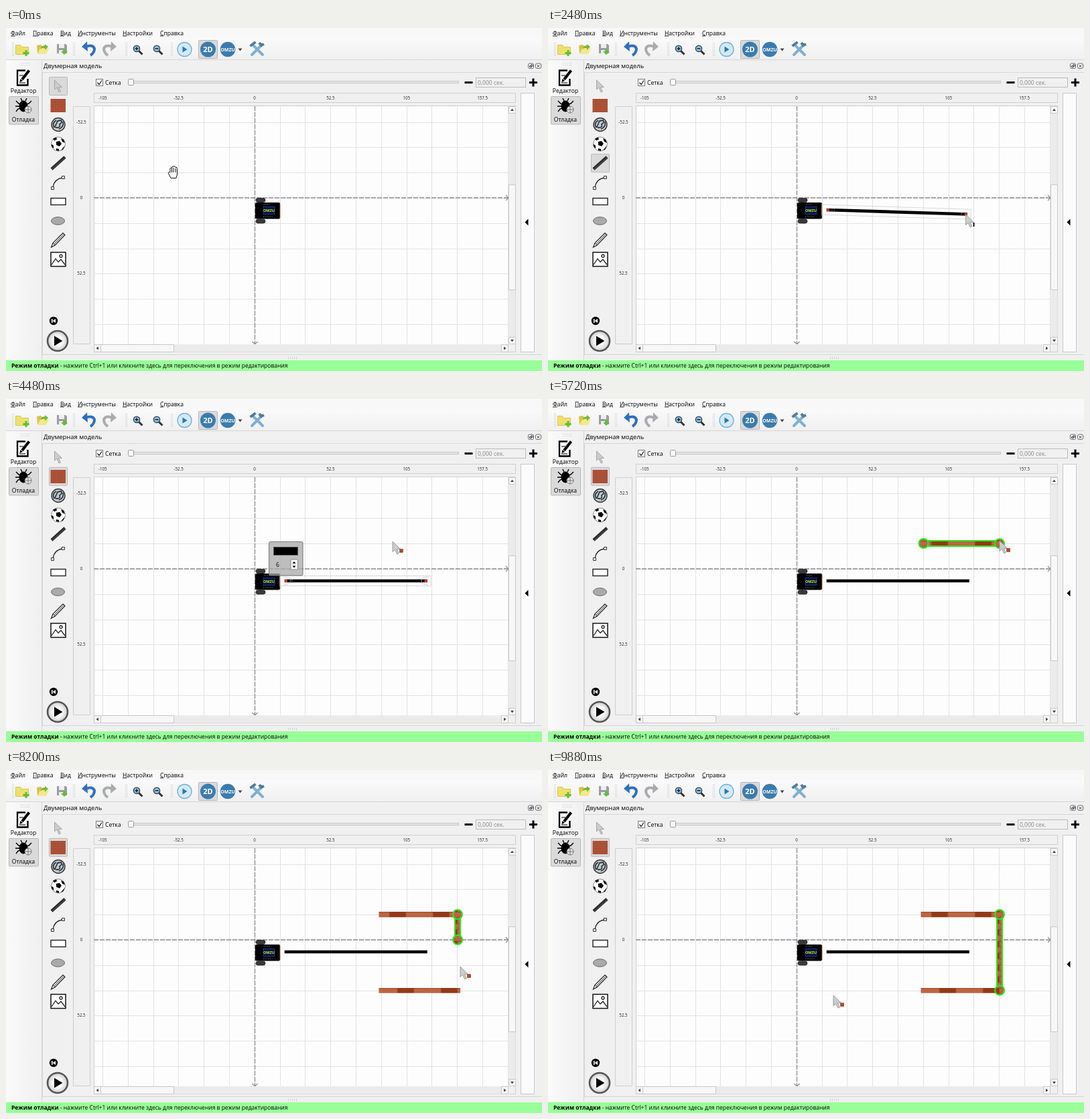
Write an HTML page that moves like this. It is 800 px wide and 513 px high and loops after 9920 ms.

```html
<!DOCTYPE html>
<html lang="ru">
<head>
<meta charset="utf-8">
<style>
  html, body { margin: 0; width: 100%; height: 100%; overflow: hidden; background: #f0f0f0; }
  svg { display: block; width: 800px; height: 513px; font: 8.6px "Open Sans", "Noto Sans", sans-serif; }
  .mid { text-anchor: middle; }
  .ruler { font-size: 6.2px; text-anchor: middle; fill: #222; }
  .ink { fill: none; stroke: #222; stroke-width: 1.3; }
  .panel { fill: #f0f0f0; stroke: #cfcfcf; }
  .pressed { fill: #dadada; stroke: #b8b8b8; }
</style>
</head>
<body>
<svg viewBox="0 0 800 513">
  <defs>
    <pattern id="brick" x="556.5" y="212" width="65" height="17.54" patternUnits="userSpaceOnUse">
      <path fill="#b9633f" d="M0 0h65v18H0z"/>
      <path fill="#953817" d="M16 0h24v8.77H16zM28 8.77h24v8.77H28z"/>
      <path fill="none" stroke="#84412a" stroke-width=".7" d="M0 .3h65M0 9h65M16 0v8.8M40 0v8.8M28 8.8v8.8M52 8.8v8.8"/>
      <path fill="none" stroke="#cc8060" stroke-width=".6" opacity=".6" d="M0 4.5h16M41 3.5h24M0 13.5h28M53 12.5h12"/>
    </pattern>
    <pattern id="wall" x="66" y="105" width="12" height="7" patternUnits="userSpaceOnUse">
      <path fill="#b5492b" d="M0 0h12v7H0z"/>
      <path fill="none" stroke="#93614f" stroke-width=".9" d="M0 .5h12M0 4h12M3.500 0v4M9.500 4v3"/>
    </pattern>
    <radialGradient id="shine"><stop offset=".4" stop-color="#fff"/><stop offset="1" stop-color="#ccc"/></radialGradient>
    <linearGradient id="barShade" x2="0" y2="1"><stop stop-color="#fafafa"/><stop offset="1" stop-color="#f0f0f0"/></linearGradient>
    <linearGradient id="sideShade"><stop stop-color="#fafafa"/><stop offset="1" stop-color="#f0f0f0"/></linearGradient>
    <clipPath id="view"><path d="M131 117h619v356H131z"/></clipPath>
  </defs>

  <path fill="#f0f0f0" d="M0 0h800v513H0z"/>
  <path fill="#f8f8f8" d="M0 0h800v15H0z"/>
  <path fill="url(#barShade)" d="M0 15h800v32H0z"/>
  <path fill="url(#sideShade)" d="M0 48h53v448H0z"/>
  <path stroke="#d6d6d6" d="M0 47.5h800M53.5 48v448"/>
  <g id="menu"></g>

  <!-- toolbar -->
  <path stroke="#bbb" stroke-dasharray="1 2" d="M9.5 22v21M11.5 22v21M100.5 22v21M102.5 22v21M178.5 22v21M180.5 22v21M246.5 22v21M248.5 22v21"/>
  <path fill="#efe06e" stroke="#d8c650" d="M14.500 25.500h7l2 3h10v11h-19z"/>
  <path stroke="#62c02f" stroke-width="3" d="M30 33v9M25.500 37.500h9"/>
  <path fill="#d9c04a" d="M46 26l6-1 2 2h7l-2 11H47z"/>
  <path fill="#f3e88a" d="M47 39l4-9h13l-4 9z"/>
  <path fill="#74b83d" d="M51 32q2-6 7-6v-2l5 4-5 5v-3q-4-1-7 2z"/>
  <path fill="#9a9da0" d="M76 24h13l2 2v12H76z"/>
  <path fill="#eee" d="M79 24h8v6h-8zM79 33h9v5h-9z"/>
  <path fill="#62bd38" d="M85 32h4v3h3l-5 5-5-5h3z"/>
  <g id="undo">
    <path fill="none" stroke="currentColor" stroke-width="4" d="M119 28q11-4 13 3 0 6-6 10"/>
    <path fill="currentColor" d="M113 28l8-8 1 15z"/>
  </g>
  <g id="zoom">
    <path stroke="#333" stroke-width="3" d="M198 34l5.500 5.500"/>
    <circle cx="195" cy="30.800" r="4.600" fill="#8fc4e6" stroke="#384b57" stroke-width="1.500"/>
    <path stroke="#123" stroke-width="1.500" d="M192.500 30.800h5"/>
  </g>
  <use href="#zoom" x="30"/>
  <path stroke="#123" stroke-width="1.500" d="M195 28.300v5"/>
  <circle cx="266.500" cy="32" r="10.500" fill="#d3eaf7" stroke="#6fb2d9" stroke-width="1.300"/>
  <path fill="#2a78ad" d="M263.500 27.500l7 4.500-7 4.500z"/>
  <rect class="pressed" x="287.500" y="18.500" width="28" height="27" rx="1"/>
  <g fill="#3b7cae"><circle cx="301.500" cy="32" r="11.500"/><circle cx="331" cy="32" r="11.300"/></g>
  <g class="mid" fill="#fff" font-weight="bold">
    <text x="301.500" y="36" font-size="11">2D</text><text x="331" y="34.700" font-size="7">OMZU</text>
  </g>
  <path fill="#444" d="M346.500 30.500h6l-3 4z"/>
  <path stroke="#7fb0d2" stroke-width="4" stroke-linecap="round" d="M369 26l14 14M381 26l-14 14"/>
  <path stroke="#517d9c" stroke-width="4" d="M364.500 27l8-6M378 22l3 4 4-2"/>

  <!-- mode buttons -->
  <path stroke="#bbb" stroke-dasharray="1 2" d="M22 52.500h14M22 55.500h14"/>
  <path fill="none" stroke="#000" stroke-width="2.300" d="M29 63.500H17v22h15.500V76"/>
  <path stroke="#000" stroke-width="4" d="M24 77L34.500 63.500"/>
  <path fill="#000" d="M20.500 81l1-5 3.500 3z"/>
  <path stroke="#000" d="M20 71h6M20 82h9"/>
  <rect class="pressed" x="4.500" y="102.500" width="44" height="41.500" rx="1"/>
  <path fill="none" stroke="#000" stroke-width="1.400" d="M22 105l2 4M31 105l-2 4M15 109l4 4 4 1M38 109l-4 4-4 1M14 117h8M15 125l3-4 4-1"/>
  <ellipse cx="26" cy="117" rx="6.500" ry="8.500"/>
  <circle cx="33" cy="122" r="5" fill="#e2e2e2" stroke="#777"/>
  <path stroke="#777" d="M28 122h10M33 117v10"/>
  <text class="mid" x="26" y="97">Редактор</text>
  <text class="mid" x="26" y="140">Отладка</text>

  <!-- dock -->
  <text x="56" y="60" font-size="9.400">Двумерная модель</text>
  <g fill="#fff" stroke="#666"><rect x="779.500" y="53" width="8" height="7.500" rx="2"/><rect x="790.500" y="53" width="8" height="7.500" rx="2"/></g>
  <path fill="none" stroke="#333" d="M781.500 58.500v-2h3v2zM783 55h3v3M792.500 55l4 4M796.500 55l-4 4"/>
  <path fill="none" stroke="#d6d6d6" d="M54.500 488V66.500H800M54 488.500h746"/>

  <rect x="134.500" y="76.500" width="10" height="10" fill="#fff" stroke="#777"/>
  <path class="ink" d="M136.500 81.500l2.500 3 4-6"/>
  <text x="148" y="84.500">Сетка</text>
  <rect x="182.500" y="79.500" width="493" height="3" fill="#e6e6e6" stroke="#c4c4c4"/>
  <rect x="182.500" y="76.500" width="8" height="9" rx="1" fill="#fafafa" stroke="#999"/>
  <path stroke="#000" stroke-width="3" d="M684.500 81.500h12M781 81.500h12M787 75.500v12"/>
  <rect class="panel" x="701.500" y="74.500" width="74" height="14" style="stroke:#bbb"/>
  <text x="704" y="84.500" fill="#888">0,000 сек.</text>

  <path class="panel" d="M131.500 97.500h629v14h-629zM100.500 117.500h25v355h-25z"/>
  <path fill="#fdfdfd" d="M131 117h619v356H131z"/>
  <path class="panel" d="M131.500 116.500h629v368h-629z" style="fill:none"/>
  <path fill="#ebebeb" d="M750.500 117h10v356h-10zM132 473.500h618v11H132z"/>
  <path fill="#f7f7f7" stroke="#c8c8c8" d="M750.500 234.500h10v157h-10zM141.500 473.500h109v11h-109zM750.500 117.500h10v10h-10zM750.500 462.500h10v10h-10zM131.500 473.500h10v11h-10zM739.500 473.500h10v11h-10z"/>
  <path fill="#444" d="M753 124h5l-2.500-3.500zM753 466h5l-2.500 3.500zM138 476.500v5l-3.500-2.500zM743 476.500v5l3.500-2.500z"/>
  <rect x="768.500" y="97.500" width="20" height="387" fill="#fbfbfb" stroke="#c8c8c8"/>
  <path d="M779.500 285.500v10l-5-5z"/>
  <path stroke="#bbb" stroke-dasharray="1 2" d="M421 492.500h14M421 494.500h14"/>
  <path fill="#99ff99" d="M0 497h800v16H0z"/>
  <text x="8" y="508.300" font-size="8.500"><tspan font-weight="bold">Режим отладки</tspan> - нажмите Ctrl+1 или кликните здесь для переключения в режим редактирования</text>

  <!-- drawing tools -->
  <rect id="picked" class="pressed" x="64.500" width="27" height="27" rx="1"/>
  <path fill="#ccc" stroke="#a5a5a5" d="M72.500 78v14l3.500-3 3 7 2.500-1-3-6.500h5z"/>
  <path fill="url(#wall)" d="M66.500 106h22.500v20H66.500z"/>
  <circle cx="78" cy="144.500" r="10" fill="#c3cace" stroke="#333" stroke-width="1.400"/>
  <path fill="none" stroke="#2e3a40" stroke-width="1.800" d="M77 139l5-1q3 3-2 6 2 5-4 5l-3-1zM72 149q-4-7 3-11M79 151q8-3 6-11"/>
  <circle cx="78" cy="173.500" r="10.500" fill="#fff" stroke="#888"/>
  <path d="M75 170l5-1 3 4-3 4-5-2zM70 165.500l5-2 1 3-4 2zM82 165l4 2 2 5-4-2zM67.500 174l3 1 1 5-3-2zM86 178l2-2-3 6-3 1zM75 180l4 1v3l-4-1z"/>
  <path stroke="#2b2b2b" stroke-width="4.500" d="M68 211l20-18"/>
  <path stroke="#666" stroke-width=".8" d="M69 211l19-17"/>
  <path class="ink" d="M70 238q2-12 14-14"/>
  <path fill="#fff" stroke="#333" d="M67.500 237.500h4v4h-4zM83.500 221.500h4v4h-4z"/>
  <rect x="67" y="254.500" width="22" height="10" fill="#fff" stroke="#222" stroke-width="1.400"/>
  <ellipse cx="77.500" cy="288.500" rx="10" ry="5.800" fill="#aaa" stroke="#666"/>
  <path fill="#fff" stroke="#222" stroke-width="1.200" d="M67.500 328l2.500-6.500 15-15 3 3-15 15.500z"/>
  <path stroke="#222" d="M70 321.500l3 3.500M72 323l14-14.500"/>
  <rect x="67" y="335.500" width="22" height="21" fill="#fff" stroke="#111" stroke-width="1.500"/>
  <path class="ink" d="M68 354l6-9 4 5 4-4 6 8"/><circle cx="82" cy="341" r="2" class="ink"/>
  <circle cx="71" cy="438" r="6.200"/>
  <path fill="#fff" d="M68 435h1.500v6H68zM74 435v6l-4.500-3z"/>
  <circle cx="77" cy="468" r="15" fill="url(#shine)" stroke="#555" stroke-width="2.600"/>
  <path d="M72 460.500l12.500 7.500-12.500 7.500z"/>

  <!-- scene -->
  <g clip-path="url(#view)">
    <path id="grid" fill="none" stroke="#e2e2e6"/>
    <path fill="none" stroke="#8c8c92" stroke-width="1.300" stroke-dasharray="7 2" d="M131 254H750M371.500 117V473"/>
    <path fill="none" stroke="#8c8c92" stroke-width="1.200" d="M746 250l4 4-4 4M367.500 469l4 4 4-4"/>
    <path stroke="#555" d="M379.500 256v34"/>
    <rect x="372" y="261" width="37" height="24.500" rx="2"/>
    <path stroke="#bd7440" stroke-width=".8" d="M409 263v21"/>
    <rect x="384" y="267.500" width="17" height="11" fill="#07143a" stroke="#1d3496"/>
    <path stroke="#888" stroke-dasharray="1 1.500" d="M385 264h9M384 282.500h14"/>
    <text class="mid" x="392.500" y="275.300" font-size="5.600" font-weight="bold" fill="#c4f02c">OMZU</text>
    <g fill="#3a3a3d" stroke="#222" stroke-width=".8"><rect x="373" y="254.500" width="14" height="6" rx="3"/><rect x="373" y="286" width="14" height="6" rx="3"/></g>

    <g id="stroke">
      <path id="bar" stroke="#000" stroke-width="4.600" stroke-linecap="square"/>
      <g id="handles">
        <rect id="frame" x="-9.500" y="-7.500" height="15" fill="none" stroke="#c6c6c6" stroke-dasharray="2 1"/>
        <path stroke="#d2331c" stroke-width="4" d="M-2 0h4"/>
        <path id="endHandle" stroke="#d2331c" stroke-width="4" d="M-2 0h4"/>
        <path id="marks" fill="none" stroke="#aaa" stroke-dasharray="1 1"/>
      </g>
    </g>
    <g id="popup">
      <rect x="392.500" y="213.500" width="50.500" height="50.500" rx="2" fill="#aaa" fill-opacity=".75" stroke="#777"/>
      <rect x="399.500" y="221.500" width="36" height="12" stroke="#555"/>
      <text x="403" y="251.300">6</text>
      <rect x="425" y="240" width="10.500" height="15" rx="1" fill="#fafafa" stroke="#888"/>
      <path d="M427.500 246h5l-2.500-3zM427.500 249.500h5l-2.500 3z"/>
    </g>
    <g id="walls"></g>
  </g>

  <g id="hand" stroke="#111" fill="#fff">
    <path d="M-3 8.500l-3.500-7q-1-3 2.500-1.500V-6q1-2 2.500-.5 0-3 2.500-2.500 2-1.500 3 1.500 2.500-1 2.500 2V3L5 8.500z"/>
    <path d="M-1.500-6v6M1-7v7M4-6v6"/>
  </g>
  <g id="arrow">
    <path fill="#cdcdcd" stroke="#9c9c9c" d="M0 .5v15.500l3.700-3.200 3 6.700 2.600-1.200-3-6.500h5z"/>
    <path id="lineBadge" stroke="#111" stroke-width="2" d="M12 12.500v6"/>
    <path id="brickBadge" fill="#b04a25" stroke="#8a3a20" stroke-width=".6" d="M10.500 12h5v5h-5z"/>
  </g>
</svg>

<script>
const LOOP = 9920, STEP = 37.8, ORIGIN = { x: 371.7, y: 254 };
const $ = id => document.getElementById(id);
const show = (id, on) => $(id).setAttribute('display', on ? 'inline' : 'none');
const set = (id, name, value) => $(id).setAttribute(name, value);
const svg = document.querySelector('svg');
const add = markup => svg.insertAdjacentHTML('beforeend', markup);

// Static parts
const menu = [[7, 'Файл'], [40, 'Правка'], [81, 'Вид'], [107, 'Инструменты'], [174, 'Настройки'], [230, 'Справка']];
$('menu').innerHTML = menu.map(([x, s]) =>
  `<text x="${x}" y="10.500"><tspan text-decoration="underline">${s[0]}</tspan>${s.slice(1)}</text>`).join('');

const undo = $('undo');
undo.style.color = '#2f70bd';
const redo = undo.cloneNode(true);
redo.removeAttribute('id');
redo.style.color = '#a9acaf';
redo.setAttribute('transform', 'translate(278 0) scale(-1 1)');
undo.after(redo);

let grid = '';
for (let k = -6; k <= 10; k++) {
  grid += `M${Math.round(ORIGIN.x + k * STEP) - .5} 117v356M131 ${Math.round(ORIGIN.y + k * STEP) + .5}h619`;
}
set('grid', 'd', grid);
for (let k = -2; k <= 3; k++) add(`<text class="ruler" x="${371 + k * 113.4}" y="106.500">${k * 52.5}</text>`);
for (let k = -1; k <= 1; k++) add(`<text class="ruler" x="112.500" y="${256 + k * 113.4}">${k * 52.5}</text>`);
svg.append($('hand'), $('arrow'));

// Pointer route: time, x, y
const route = [
  [0, 249, 216], [250, 249, 216], [900, 78, 203], [1120, 78, 203],
  [1650, 418, 272], [1800, 418, 272], [2480, 623.5, 278.5], [2900, 627, 273], [3100, 627, 273],
  [3800, 78, 117], [3950, 78, 117], [4480, 577, 212.5], [4700, 560, 216], [4850, 560, 216],
  [5600, 674, 211.5], [5820, 674, 211.5], [6400, 560, 330], [6520, 560, 330],
  [7080, 648, 333], [7350, 674, 332], [7500, 674, 332], [7850, 674, 216], [7950, 674, 216],
  [8200, 678, 293.5], [8450, 676, 330], [8750, 676, 330], [9400, 426, 336.5], [LOOP, 426, 336.5]
];
const walls = [
  { from: 4850, to: 5820, x: 560.5, y: 216 },
  { from: 6520, to: 7500, x: 560.5, y: 330 },
  { from: 7950, to: 8750, x: 674, y: 216 }
];

function pointerAt(t) {
  const i = Math.max(1, route.findIndex(p => p[0] >= t));
  const [t0, x0, y0] = route[i - 1], [t1, x1, y1] = route[i];
  const u = (t - t0) / (t1 - t0), s = u * u * (3 - 2 * u);
  return { x: x0 + (x1 - x0) * s, y: y0 + (y1 - y0) * s };
}

const snap = (v, axis) => ORIGIN[axis] + Math.round((v - ORIGIN[axis]) / STEP) * STEP;

function wallMarkup({ from, to, x, y }, t, selected) {
  // The snapped end trails the pointer slightly
  const p = pointerAt(Math.max(from, Math.min(t - 120, to)));
  const ex = snap(p.x, 'x'), ey = snap(p.y, 'y');
  const body = `<rect x="${x - 4}" y="${y - 4}" width="${ex - x + 8}" height="${ey - y + 8}" fill="url(#brick)"`;
  if (!selected) return body + '/>';
  const knob = (cx, cy) => `<circle cx="${cx}" cy="${cy}" r="7" fill="url(#brick)"/>`;
  return `<g stroke="#22ee18" stroke-width="2">${body}/>${knob(x, y)}${knob(ex, ey)}</g>`;
}

function drawLine(t) {
  show('stroke', t >= 1800);
  const start = { x: 418, y: 272 }, drawing = t < 3000;
  const end = drawing ? pointerAt(Math.max(t, 1800)) : { x: 626.5, y: start.y };
  const dx = end.x - start.x, dy = end.y - start.y, length = Math.hypot(dx, dy);
  set('stroke', 'transform', `translate(${start.x} ${start.y}) rotate(${Math.atan2(dy, dx) * 180 / Math.PI})`);
  set('bar', 'd', `M0 0H${length}`);
  set('frame', 'width', length + 17);
  set('endHandle', 'transform', `translate(${length})`);
  set('marks', 'd', `M6-2v4M9-2v4M${length - 6}-2v4` +
    (drawing ? '' : `M-4-6q12 0 11 6t-11 6M${length + 4}-6q-12 0-11 6t11 6`));
  show('handles', t < walls[0].from);
  show('popup', t >= 3000 && t < walls[0].from);
}

function draw(t) {
  const p = pointerAt(t), inScene = p.x > 131;
  const tool = t < 1000 ? 0 : t < 3880 ? 4 : 1;
  set('picked', 'y', 73.5 + tool * 28.8);
  drawLine(t);
  const started = walls.filter(w => t >= w.from);
  $('walls').innerHTML = started.map((w, i) => wallMarkup(w, t, i === started.length - 1)).join('');

  const at = `translate(${p.x} ${p.y})`, grabbing = inScene && tool === 0;
  set('hand', 'transform', at);
  set('arrow', 'transform', at);
  show('hand', grabbing);
  show('arrow', !grabbing);
  show('lineBadge', inScene && tool === 4);
  show('brickBadge', inScene && tool === 1);
}

const begin = performance.now();
function tick() {
  const t = (performance.now() - begin) % LOOP;
  draw(Math.floor(t / 40) * 40);
  requestAnimationFrame(tick);
}
tick();
</script>
</body>
</html>
```
